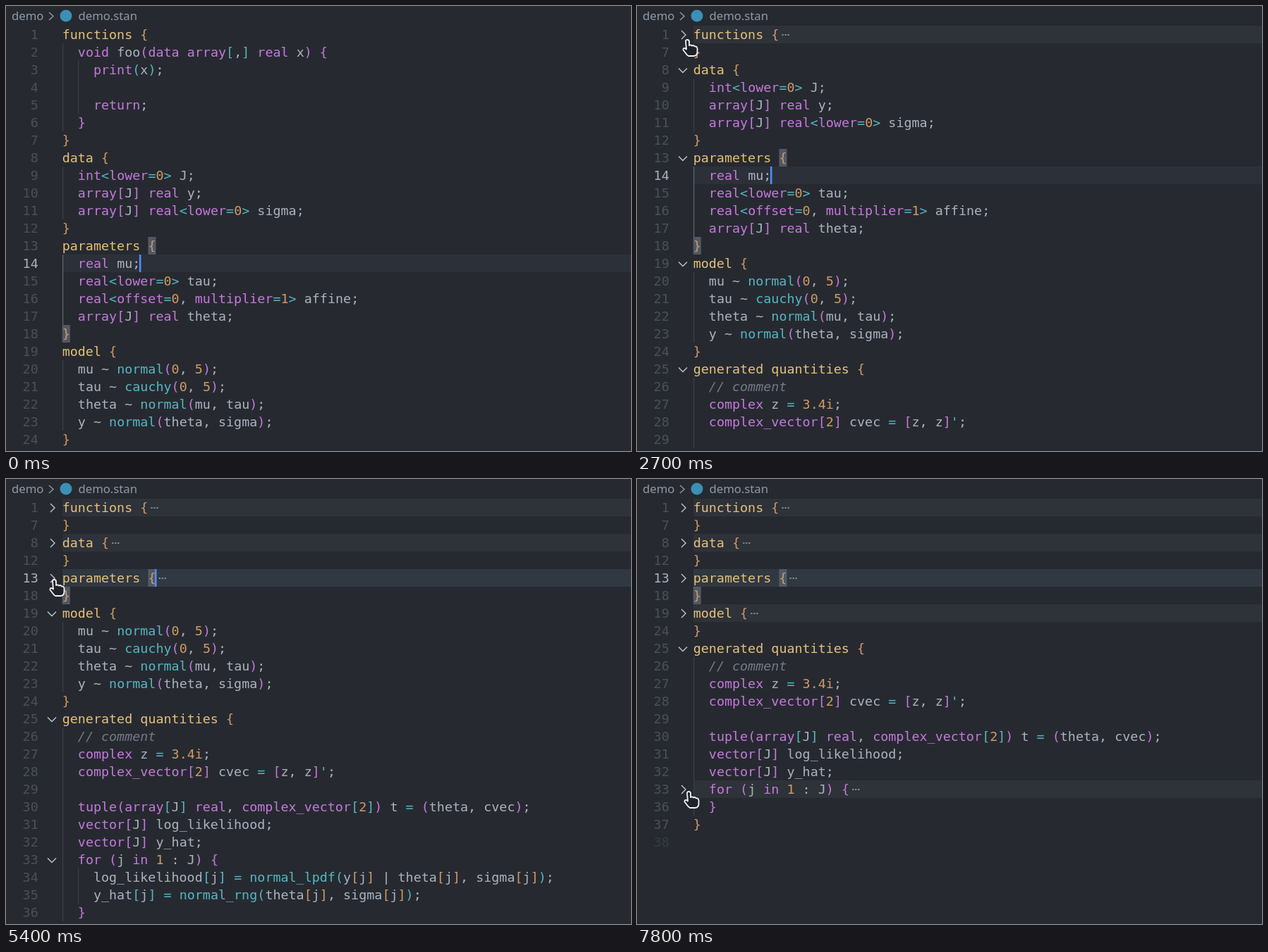
An HTML page with a canvas for the animation above (8000 ms loop, 886 by 632 pixels).

```html
<!DOCTYPE html>
<html lang="en">
<head>
<meta charset="utf-8">
<title>Code folding</title>
<style>
html, body { margin: 0; width: 100%; height: 100%; overflow: hidden; background: #262a30; }
canvas { display: block; }
</style>
</head>
<body>
<canvas id="stage" width="886" height="632"></canvas>
<script>
const ctx = document.getElementById('stage').getContext('2d');
const W = 886, H = 632, LOOP = 8000;
const TOP = 28, ROW = 25, LEFT = 79.7, FONT_SIZE = 18.38, CHAR = FONT_SIZE * 0.60205;
const MONO = FONT_SIZE + 'px "DejaVu Sans Mono", monospace';

const COLOR = {
  bg: '#262a30', text: '#abb2bf', block: '#e5c07b', keyword: '#c678dd', call: '#56b6c2',
  number: '#d19a66', comment: '#747b87', lineNo: '#495059', lastNo: '#363b42',
  current: '#2c3038', folded: '#2e3239', currentFolded: '#303841', match: '#505966',
  guide: '#3b4048', activeGuide: '#626974', caret: '#528bff', crumb: '#9199a5'
};
const BRACKETS = [COLOR.number, COLOR.keyword, COLOR.call];

const source = `functions {
  void foo(data array[,] real x) {
    print(x);

    return;
  }
}
data {
  int<lower=0> J;
  array[J] real y;
  array[J] real<lower=0> sigma;
}
parameters {
  real mu;
  real<lower=0> tau;
  real<offset=0, multiplier=1> affine;
  array[J] real theta;
}
model {
  mu ~ normal(0, 5);
  tau ~ cauchy(0, 5);
  theta ~ normal(mu, tau);
  y ~ normal(theta, sigma);
}
generated quantities {
  // comment
  complex z = 3.4i;
  complex_vector[2] cvec = [z, z]';

  tuple(array[J] real, complex_vector[2]) t = (theta, cvec);
  vector[J] log_likelihood;
  vector[J] y_hat;
  for (j in 1 : J) {
    log_likelihood[j] = normal_lpdf(y[j] | theta[j], sigma[j]);
    y_hat[j] = normal_rng(theta[j], sigma[j]);
  }
}
`.split('\n');

// first line, last hidden line, time of folding
const folds = [
  [1, 6, 2700], [2, 5, Infinity], [8, 11, 3900], [13, 17, 5100],
  [19, 23, 6100], [25, 36, Infinity], [33, 35, 7600]
].map(([start, end, at]) => ({ start, end, at, indent: source[start - 1].search(/\S/) }));

const caretOn = [
  [0, 400], [900, 2000], [2500, 3000], [3500, 4400], [4900, 5100],
  [5200, 5700], [6200, 6700], [7200, 7700]
];

// time, x, y of the pointer
const pointerPath = [
  [1100, -18, 95], [1300, 23, 72], [1900, 66, 45], [2700, 72, 48], [3300, 74, 86],
  [4100, 74, 86], [4700, 64, 124], [5100, 69, 142], [5400, 69, 143], [6000, 70, 196],
  [6200, 70, 196], [7000, 74, 444], [LOOP, 74, 444]
];

const KEYWORDS = /^(void|data|array|real|int|print|return|lower|offset|multiplier|complex|complex_vector|tuple|vector|for|in)$/;
const CALLS = /^(normal|cauchy|normal_lpdf|normal_rng)$/;

function tokenize() {
  let depth = 0;
  const pick = text => {
    if (/^[{(\[]$/.test(text)) return BRACKETS[depth++ % 3];
    if (/^[})\]]$/.test(text)) return BRACKETS[--depth % 3];
    if (text.startsWith('//')) return COLOR.comment;
    if (/^\d/.test(text)) return COLOR.number;
    if (/^[<>=']$/.test(text) || CALLS.test(text)) return COLOR.call;
    return KEYWORDS.test(text) ? COLOR.keyword : COLOR.text;
  };
  return source.map(line =>
    [...line.matchAll(/\/\/.*|\d[\d.i]*|\w+|\S/g)].map(m => ({
      text: m[0], col: m.index,
      color: m.index === 0 && /\w/.test(m[0]) || m[0] === 'quantities' ? COLOR.block : pick(m[0])
    })));
}
const tokens = tokenize();

const colX = col => LEFT + col * CHAR;
const rowY = row => TOP + row * ROW;

function rect(color, x, y, w, h) {
  ctx.fillStyle = color;
  ctx.fillRect(x, y, w, h);
}

function polyline(points, color, width) {
  ctx.beginPath();
  points.forEach(([x, y]) => ctx.lineTo(x, y));
  ctx.strokeStyle = color;
  ctx.lineWidth = width;
  ctx.stroke();
}

function drawBreadcrumb() {
  ctx.font = '16.7px "Noto Sans", sans-serif';
  ctx.textAlign = 'left';
  ctx.fillStyle = COLOR.crumb;
  ctx.fillText('demo', 8, 20);
  ctx.fillText('demo.stan', 102.5, 20);
  polyline([[61, 9], [67, 14.5], [61, 20]], COLOR.crumb, 1.4);
  ctx.fillStyle = '#3d8fb5';
  ctx.beginPath();
  ctx.arc(85, 14, 8.5, 0, 7);
  ctx.fill();
}

function drawChevron(y, closed, alpha) {
  ctx.globalAlpha = closed ? 1 : alpha;
  const points = closed
    ? [[63, y + 7], [69, y + 13], [63, y + 19]]
    : [[59, y + 10.5], [65, y + 16.5], [71, y + 10.5]];
  polyline(points, '#c0c5cd', 1.4);
  ctx.globalAlpha = 1;
}

function drawCode(line, y) {
  for (const { text, col, color } of tokens[line - 1]) {
    ctx.font = (color === COLOR.comment ? 'italic ' : '') + MONO;
    ctx.fillStyle = color;
    ctx.fillText(text, colX(col), y + 18.8);
  }
}

function drawLine(line, row, t, currentLine) {
  const y = rowY(row);
  const fold = folds.find(f => f.start === line);
  const closed = fold && t >= fold.at;
  const current = line === currentLine;
  const endX = colX(source[line - 1].length);

  if (closed || current) {
    const color = closed && current ? COLOR.currentFolded : closed ? COLOR.folded : COLOR.current;
    rect(color, 80, y, W - 80, ROW);
  }
  if (line === 13) rect(COLOR.match, colX(11), y, CHAR, ROW);
  if (line === 18) rect(COLOR.match, colX(0), y, CHAR, ROW);

  for (const f of folds) {
    if (line > f.start && line <= f.end) {
      rect(f.start === 13 ? COLOR.activeGuide : COLOR.guide, Math.round(colX(f.indent)), y, 1.2, ROW);
    }
  }

  ctx.font = MONO;
  ctx.textAlign = 'right';
  ctx.fillStyle = current ? COLOR.text : line === source.length ? COLOR.lastNo : COLOR.lineNo;
  ctx.fillText(line, 45.7, y + 18.8);
  ctx.textAlign = 'left';
  drawCode(line, y);

  if (fold) drawChevron(y, closed, Math.min(1, Math.max(0, (t - 1200) / 500)));
  if (closed) {
    for (let i = 0; i < 3; i++) rect('#7f858f', endX + 4 + i * 4, y + 12, 2.4, 2);
  }
  if (current && caretOn.some(([on, off]) => t >= on && t < off)) {
    rect(COLOR.caret, endX - 1.5, y, 2.6, ROW);
  }
}

function pointerAt(t) {
  const i = pointerPath.findIndex(p => p[0] > t);
  if (i < 1) return null;
  const [t0, x0, y0] = pointerPath[i - 1], [t1, x1, y1] = pointerPath[i];
  const k = (t - t0) / (t1 - t0), ease = k * k * (3 - 2 * k);
  return [x0 + (x1 - x0) * ease, y0 + (y1 - y0) * ease];
}

const arrow = new Path2D('M0 1V22L5 17.5L9 25.5L12.5 24L9 16H15.5Z');
const hand = new Path2D('M-3 2Q-2.5 -.5 0 0Q2 .3 2 3V8Q4 6.5 6 8.5Q8 7 10 9.5Q13.5 9 13.5 13V17' +
  'Q13.5 23 8 23H1Q-1 22 -3 19L-6.5 14.5Q-7 11.5 -4 12L-2 13.5Z');

function drawPointer(t, visible) {
  const pos = pointerAt(t);
  if (!pos) return;
  const line = visible[Math.floor((pos[1] - TOP) / ROW)];
  const overFold = pos[0] >= 58 && folds.some(f => f.start === line);
  const shape = overFold ? hand : arrow;
  ctx.save();
  ctx.translate(pos[0], pos[1]);
  ctx.lineJoin = 'round';
  ctx.fillStyle = '#1f2327';
  ctx.fill(shape);
  ctx.strokeStyle = '#f2f4f6';
  ctx.lineWidth = 1.8;
  ctx.stroke(shape);
  ctx.restore();
}

function draw(t) {
  rect(COLOR.bg, 0, 0, W, H);
  drawBreadcrumb();
  const visible = source.map((_, i) => i + 1)
    .filter(n => !folds.some(f => t >= f.at && n > f.start && n <= f.end))
    .slice(0, 24);
  const currentLine = visible.includes(14) ? 14 : 13;
  visible.forEach((line, row) => drawLine(line, row, t, currentLine));
  drawPointer(t, visible);
}

const begin = performance.now();
function frame() {
  draw((performance.now() - begin) % LOOP);
  requestAnimationFrame(frame);
}
frame();
</script>
</body>
</html>
```
